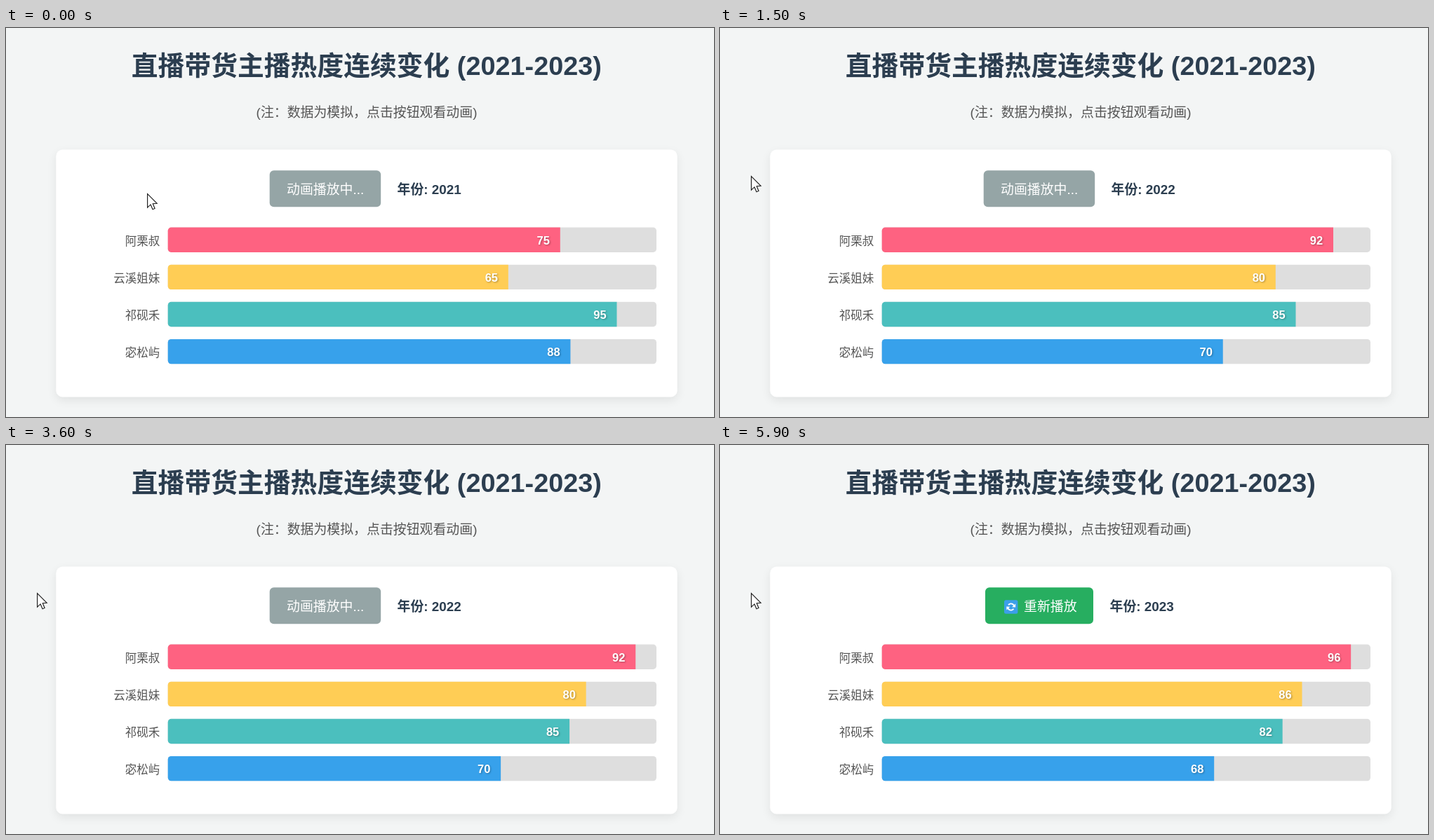
Recreate the animation shown at these times as an HTML page with a canvas. Size 1009 by 555 pixels, loop 6000 ms.

```html
<!DOCTYPE html>
<html lang="zh-CN">
<head>
<meta charset="utf-8">
<title>主播热度</title>
<style>
  html, body { margin: 0; width: 100%; height: 100%; overflow: hidden; background: #f3f5f5; }
  canvas { display: block; }
</style>
</head>
<body>
<canvas id="stage" width="1009" height="555"></canvas>
<script>
const ctx = document.getElementById('stage').getContext('2d');
const FAMILY = '"Liberation Sans", "Noto Sans CJK SC", "Noto Sans CJK", sans-serif';
const LOOP = 6000, STEP = 100;
const INK = '#2c3e50';
const TRACK = { x: 230.7, y: 284.6, w: 696.3, h: 35.4, gap: 53.1, r: 4.7 };
const YEARS = [2021, 2022, 2023];
const ROWS = [
  { name: '阿栗叔', color: '#fe6281', values: [75, 92, 96] },
  { name: '云溪姐妹', color: '#ffcd55', values: [65, 80, 86] },
  { name: '祁砚禾', color: '#4bbfbe', values: [95, 85, 82] },
  { name: '宓松屿', color: '#37a1eb', values: [88, 70, 68] }
];

const lerp = (a, b, k) => a + (b - a) * k;
const clamp = (v, lo, hi) => Math.min(hi, Math.max(lo, v));
const easeInOut = x => x < 0.5 ? 2 * x * x : 1 - 2 * (1 - x) * (1 - x);

function text(str, x, y, size, color, weight = 400, align = 'left') {
  ctx.font = `${weight} ${size}px ${FAMILY}`;
  ctx.textAlign = align;
  ctx.fillStyle = color;
  ctx.fillText(str, x, y);
}

function box(x, y, w, h, r, color) {
  ctx.beginPath();
  ctx.roundRect(x, y, w, h, r);
  ctx.fillStyle = color;
  ctx.fill();
}

function shadow(color, blur, dx, dy) {
  ctx.shadowColor = color;
  ctx.shadowBlur = blur;
  ctx.shadowOffsetX = dx;
  ctx.shadowOffsetY = dy;
}

function drawPage() {
  ctx.fillStyle = '#f3f5f5';
  ctx.fillRect(0, 0, 1009, 555);
  text('直播带货主播热度连续变化 (2021-2023)', 513.8, 67, 37.8, INK, 700, 'center');
  text('(注：数据为模拟，点击按钮观看动画)', 514, 127, 18.9, '#555', 400, 'center');
  ctx.save();
  shadow('rgba(0,0,0,0.08)', 14, 0, 4.7);
  box(71.3, 173.6, 885.4, 353, 9.4, '#fff');
  ctx.restore();
}

function drawReplayIcon(cx, cy) {
  box(cx - 9.7, cy - 9.7, 19.4, 19.4, 2.5, '#3c9fe9');
  ctx.strokeStyle = ctx.fillStyle = '#fff';
  ctx.lineWidth = 2;
  for (const turn of [0, Math.PI]) {
    ctx.save();
    ctx.translate(cx, cy);
    ctx.rotate(turn);
    ctx.beginPath();
    ctx.arc(0, 0, 4.6, -2.5, -0.35);
    ctx.stroke();
    ctx.beginPath();
    ctx.moveTo(6.4, -4.6);
    ctx.lineTo(6.4, 0.6);
    ctx.lineTo(1.4, 0.2);
    ctx.fill();
    ctx.restore();
  }
}

function drawControls(stage) {
  const done = stage === 2;
  if (done) {
    box(378, 203.2, 154, 52, 5.9, '#27ae60');
    drawReplayIcon(414.7, 231);
    text('重新播放', 433, 237, 18.9, '#fff', 500);
  } else {
    box(375.7, 203.2, 158.5, 52, 5.9, '#95a5a6');
    text('动画播放中...', 400, 237, 18.9, '#fff', 500);
  }
  text('年份: ' + YEARS[stage], done ? 555.5 : 557.5, 237, 18.9, INK, 700);
}

function drawBars(progress, stage) {
  const from = progress < 1 ? 0 : 1;
  ROWS.forEach(({ name, color, values }, i) => {
    const y = TRACK.y + i * TRACK.gap;
    const value = lerp(values[from], values[from + 1], progress - from);
    const width = TRACK.w * value / 100;
    text(name, 219.3, y + 25, 16.54, '#555', 400, 'right');
    box(TRACK.x, y, TRACK.w, TRACK.h, TRACK.r, '#dedede');
    box(TRACK.x, y, width, TRACK.h, [TRACK.r, 0, 0, TRACK.r], color);
    ctx.save();
    shadow('rgba(0,0,0,0.3)', 2.4, 1.2, 1.2);
    text(values[stage], TRACK.x + width - 14.8, y + 23.9, 16.54, '#fff', 700, 'right');
    ctx.restore();
  });
}

function drawCursor(t) {
  const k = clamp(t / 800, 0, 1);
  ctx.save();
  ctx.translate(lerp(201.6, 44.6, k), lerp(236.6, 211.6, k));
  ctx.scale(1.18, 1.18);
  ctx.beginPath();
  [[0, 0], [0, 16.5], [3.8, 13], [6.3, 18.8], [8.9, 17.7], [6.5, 12], [11.5, 11.6]]
    .forEach(([x, y]) => ctx.lineTo(x, y));
  ctx.closePath();
  ctx.fillStyle = '#fff';
  ctx.fill();
  ctx.strokeStyle = '#222';
  ctx.lineWidth = 1;
  ctx.stroke();
  ctx.restore();
}

function draw(t) {
  // The eased run is already under way when the loop begins.
  const x = clamp(0.279 + t * 0.000164, 0, 1);
  const progress = 2 * easeInOut(x);
  const stage = Math.floor(progress);
  drawPage();
  drawControls(stage);
  drawBars(progress, stage);
  drawCursor(t);
}

const start = performance.now();
function tick() {
  const t = (performance.now() - start) % LOOP;
  draw(Math.floor(t / STEP) * STEP);
  requestAnimationFrame(tick);
}
tick();
</script>
</body>
</html>
```
